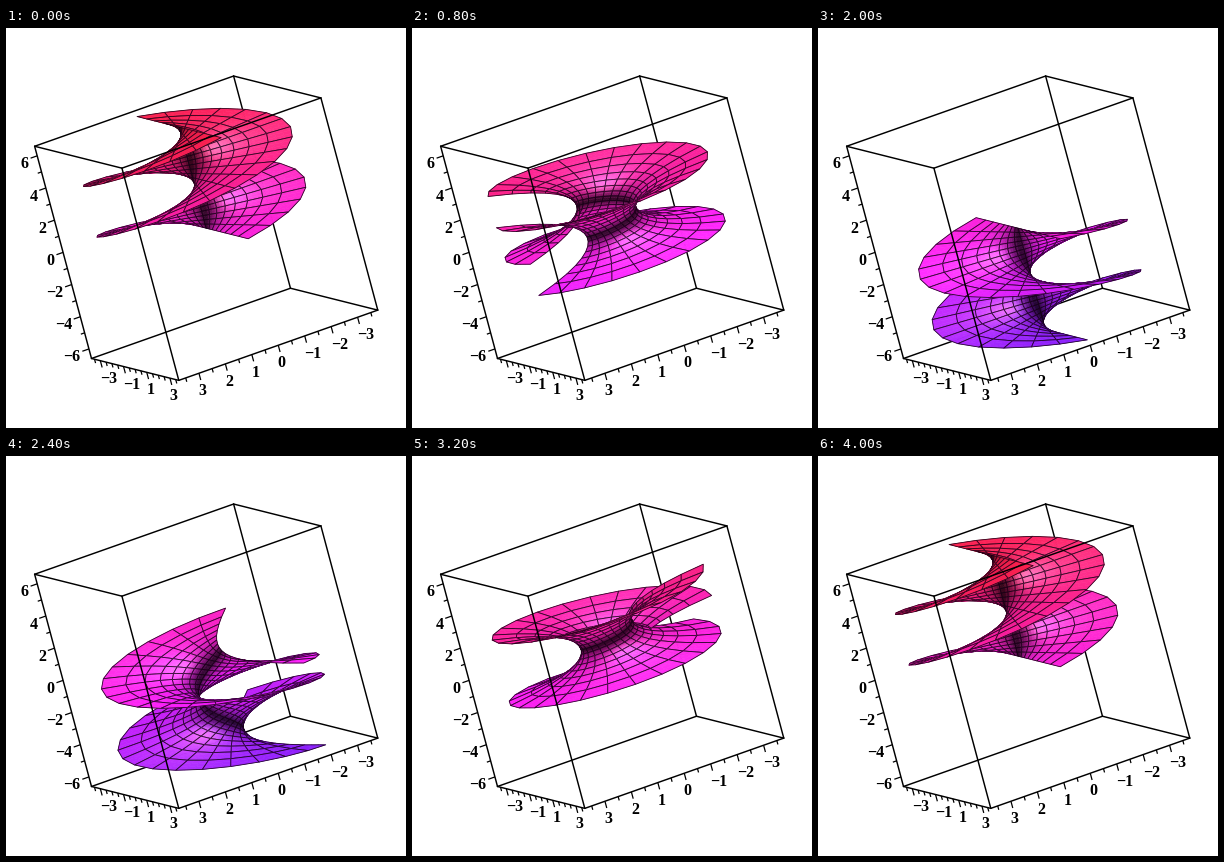
A matplotlib script for the animation above (4100 ms loop, 400x400 px).

```python
import numpy as np
import matplotlib.pyplot as plt
from matplotlib.animation import FuncAnimation
from matplotlib.collections import LineCollection, PolyCollection
from matplotlib.colors import hsv_to_rgb

SIZE, DPI = 400, 100
FRAMES, INTERVAL = 41, 100
NU, NV, SUB = 24, 16, 3          # grid cells and shading steps per cell
V_MAX = 2.0
R_MAX, Z_MAX = np.cosh(V_MAX), 6.594
LIMITS = np.array([R_MAX, R_MAX, Z_MAX])


def camera(theta, phi, roll):
    """Rows: screen right, screen down, towards the viewer."""
    t, p, r = np.radians([theta, phi, roll])
    right = np.array([-np.sin(t), np.cos(t), 0])
    up = np.array([-np.cos(p) * np.cos(t), -np.cos(p) * np.sin(t), np.sin(p)])
    toward = np.array([np.sin(p) * np.cos(t), np.sin(p) * np.sin(t), np.cos(p)])
    return np.array([np.cos(r) * right - np.sin(r) * up,
                     -np.sin(r) * right - np.cos(r) * up,
                     toward])


VIEW = 112.3 * camera(69.5, 78, 15)
CENTER = np.array([200.2, 200.2, 0])


def unit(v):
    v = np.asarray(v, float)
    return v / np.linalg.norm(v, axis=-1, keepdims=True)


LIGHT = unit([-0.05, -0.15, 0.98])
HALF = unit([0.10, 0.49, 0.87])


def project(points):
    return (np.asarray(points) / LIMITS) @ VIEW.T + CENTER


U, V = np.meshgrid(np.linspace(0, 2 * np.pi, NU + 1),
                   np.linspace(-V_MAX, V_MAX, NV + 1), indexing="ij")
SU, CU, SH, CH = np.sin(U), np.cos(U), np.sinh(V), np.cosh(V)


def surface(angle):
    """Points and unit normals between helicoid and catenoid."""
    c, s = np.cos(angle), np.sin(angle)
    one = np.ones_like(U)
    points = np.stack([c * SH * SU + s * CH * CU,
                       -c * SH * CU + s * CH * SU,
                       c * U + s * V], -1)
    du = np.stack([c * SH * CU - s * CH * SU,
                   c * SH * SU + s * CH * CU, c * one], -1)
    dv = np.stack([c * CH * SU + s * SH * CU,
                   -c * CH * CU + s * SH * SU, s * one], -1)
    return points, unit(np.cross(du / LIMITS, dv / LIMITS))


def refine_rows(a):
    n = len(a)
    t = np.arange((n - 1) * SUB + 1) / SUB
    i = np.minimum(t.astype(int), n - 2)
    f = (t - i)[:, None, None]
    return a[i] * (1 - f) + a[i + 1] * f


def refine(a):
    return refine_rows(refine_rows(a).swapaxes(0, 1)).swapaxes(0, 1)


def corners(a):
    return np.stack([a[:-1, :-1], a[1:, :-1], a[1:, 1:], a[:-1, 1:]], 2)


def by_cell(a):
    """Group the small quads by the grid cell they belong to."""
    tail = a.shape[2:]
    a = a.reshape(NU, SUB, NV, SUB, *tail).swapaxes(1, 2)
    return a.reshape(NU * NV, SUB * SUB, *tail)


def shade(z, normals):
    hue = (308 + 6.3 * z) / 360
    base = hsv_to_rgb(np.stack([hue, np.full_like(z, 0.88), np.ones_like(z)], -1))
    diffuse = np.abs(normals @ LIGHT)[..., None]
    gloss = np.abs(normals @ HALF)[..., None] ** 25
    return np.clip(base * (0.15 + 0.85 * diffuse) + 0.36 * gloss, 0, 1)


def mesh(angle):
    points, normals = surface(angle)
    screen = project(points)
    fine = refine(screen[..., :2])
    rgb = shade(refine(points[..., 2:])[..., 0], unit(refine(normals)))

    cells = corners(screen)
    outline = cells[..., :2].reshape(NU * NV, 1, 4, 2)
    quads = np.concatenate([by_cell(corners(fine)), outline], 1)

    fill = by_cell(corners(rgb).mean(2))
    fill = np.concatenate([fill, np.ones(fill.shape[:2] + (1,))], 2)
    face = np.concatenate([fill, np.zeros((NU * NV, 1, 4))], 1)
    edge = np.concatenate([fill, np.tile([0.08, 0, 0.08, 0.9], (NU * NV, 1, 1))], 1)

    order = np.argsort(cells[..., 2].mean(2).ravel())
    return (quads[order].reshape(-1, 4, 2),
            face[order].reshape(-1, 4),
            edge[order].reshape(-1, 4))


fig = plt.figure(figsize=(SIZE / DPI, SIZE / DPI), dpi=DPI, facecolor="white")
ax = fig.add_axes([0, 0, 1, 1])
ax.set_xlim(0, SIZE)
ax.set_ylim(SIZE, 0)
ax.axis("off")


def draw_box():
    back, front = [], []
    for axis in range(3):
        for a in (-1, 1):
            for b in (-1, 1):
                ends = np.insert([[a, b], [a, b]], axis, [-1, 1], axis=1)
                line = project(ends * LIMITS)[:, :2]
                (back if a == b == -1 else front).append(line)
    for lines, z in ((back, 1), (front, 3)):
        ax.add_collection(LineCollection(lines, colors="black", linewidths=1.05,
                                         capstyle="round", zorder=z))


def draw_axis(axis, fixed, values, majors, out, shift, align):
    """Ticks and numbers along one box edge; out is the tick direction."""
    ticks = []
    for value in values:
        point = np.array(fixed) * LIMITS
        point[axis] = value
        x, y, _ = project(point)
        major = value in majors
        length = 7 if major else 4
        ticks.append([(x, y), (x + out[0] * length, y + out[1] * length)])
        if major:
            ax.text(x + shift[0], y + shift[1], f"{int(value)}".replace("-", "\u2212"),
                    family="Liberation Serif", weight="bold", size=11.5,
                    ha=align, va="baseline", zorder=4)
    ax.add_collection(LineCollection(ticks, colors="black", linewidths=0.9, zorder=3))


halves = np.arange(-3.5, 3.6, 0.5)
down, left = -unit(VIEW[:2, 2]), unit(VIEW[:2, 0])
draw_box()
draw_axis(0, (0, 1, -1), halves, range(-3, 4), down, (-0.5, 22), "left")
draw_axis(1, (1, 0, -1), halves, (-3, -1, 1, 3), down, (-0.5, 22), "left")
draw_axis(2, (1, -1, 0), range(-6, 7), range(-6, 7, 2), left, (-8.3, 12.5), "right")

sheet = PolyCollection([], linewidths=[0.4] * SUB ** 2 + [0.6],
                       joinstyle="round", zorder=2)
ax.add_collection(sheet)


def update(frame):
    quads, face, edge = mesh(2 * np.pi * frame / (FRAMES - 1))
    sheet.set_verts(quads)
    sheet.set_facecolor(face)
    sheet.set_edgecolor(edge)
    return (sheet,)


anim = FuncAnimation(fig, update, frames=FRAMES, interval=INTERVAL,
                     repeat=True, repeat_delay=0, blit=False)
plt.show()
```
